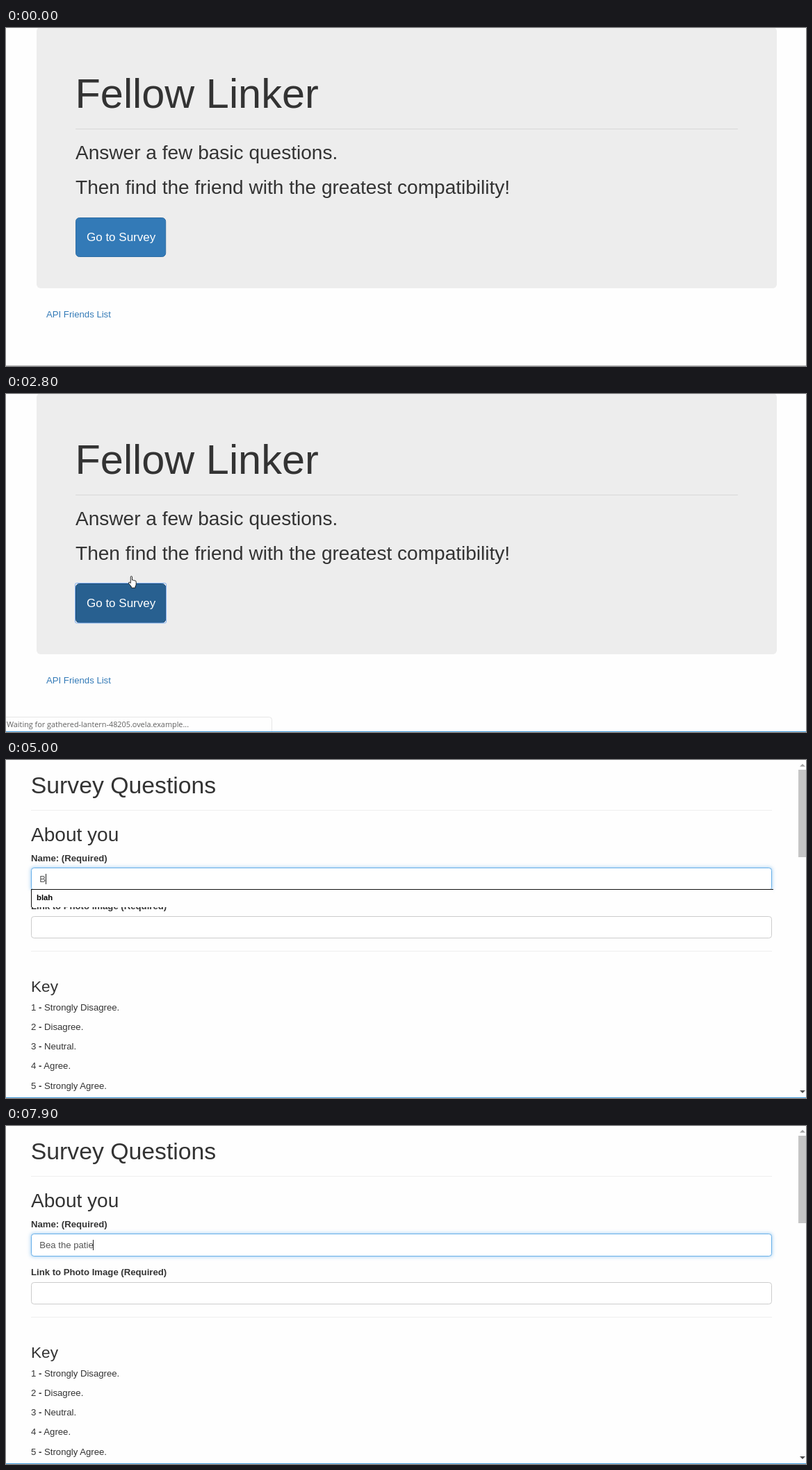
An HTML page for the animation above (8000 ms loop, 1151 by 487 pixels).

```html
<!DOCTYPE html>
<html lang="en">
<head>
<meta charset="utf-8">
<title>Survey</title>
<style>
  html, body { margin: 0; width: 100%; height: 100%; overflow: hidden; background: #fefefe; }
  svg { display: block; width: 1151px; height: 487px; }
  text { font-family: "Liberation Sans", Arial, sans-serif; font-size: 13.17px; fill: #333; white-space: pre; }
  .h1 { font-size: 33.75px; }
  .h2 { font-size: 28.06px; }
  .h3 { font-size: 22.65px; }
  .b { font-weight: bold; }
  .box { fill: #fff; stroke: #ccc; }
  .cursor { fill: #fff; stroke: #111; stroke-width: .9; stroke-linejoin: round; }
  .status { font-family: "Open Sans", "Noto Sans", sans-serif; font-size: 10.85px; fill: #606060; }
</style>
</head>
<body>
<svg viewBox="0 0 1151 487" xmlns="http://www.w3.org/2000/svg">
  <defs>
    <filter id="blur" x="-5%" y="-60%" width="110%" height="220%"><feGaussianBlur stdDeviation="2.6"/></filter>
  </defs>
  <rect width="1151" height="487" fill="#fefefe"/>

  <g id="home">
    <rect x="44" y="-1" width="1065" height="376" rx="5.7" fill="#ededed"/>
    <text x="99.5" y="115" style="font-size:59.46px">Fellow Linker</text>
    <rect x="100" y="145" width="953" height="1" fill="#d8d8d8"/>
    <text class="h2" x="100" y="189">Answer a few basic questions.</text>
    <text class="h2" x="100" y="238.5">Then find the friend with the greatest compatibility!</text>
    <rect id="button" x="100.5" y="273.5" width="129.2" height="56" rx="5.2"/>
    <rect id="ring" x="99.5" y="272.5" width="131" height="57.5" rx="2" fill="none" stroke="#7fb0f2"/>
    <text x="116" y="307" style="font-size:17px;fill:#fff">Go to Survey</text>
    <text x="58" y="416.5" style="fill:#337ab7">API Friends List</text>
  </g>

  <g id="survey">
    <text class="h1" x="35.8" y="47.5">Survey Questions</text>
    <rect x="36" y="72" width="1066" height="1" fill="#eee"/>
    <text class="h2" x="36" y="117">About you</text>
    <text class="b" x="36" y="146">Name: (Required)</text>
    <rect id="glow" x="35" y="154" width="1068" height="35" rx="5" fill="#66afe9" filter="url(#blur)"/>
    <rect id="field" class="box" x="36.5" y="155.5" width="1065" height="32" rx="3.8"/>
    <text id="name" x="48.2" y="176" style="fill:#555"></text>
    <rect id="caret" y="164" width="1" height="15" fill="#222"/>
    <text class="b" x="36" y="215">Link to Photo Image (Required)</text>
    <rect class="box" x="36.5" y="225.5" width="1065" height="31" rx="3.8"/>
    <g id="popup">
      <rect id="sheet" x="36" y="186" width="1068" fill="#fefefe"/>
      <rect x="36" y="186" width="1068" height="1" fill="#111"/>
      <rect id="edge" x="36" y="186" width="1" fill="#111"/>
      <text id="hint" class="b" x="44" y="202" style="font-size:11.33px;fill:#000">blah</text>
    </g>
    <rect x="36" y="275" width="1066" height="1" fill="#eee"/>
    <text class="h3" x="36" y="334">Key</text>
    <g id="key"></g>
    <rect x="1140" y="14" width="11" height="126" fill="#c5c5c5"/>
    <path d="M1142 9.5h8l-4-4z" fill="#a3a3a3"/>
    <path d="M1142 476h8l-4 4z" fill="#505050"/>
  </g>

  <g id="status">
    <path d="M-1 465.5H378.5a4 4 0 0 1 4 4V487H-1z" fill="#fefefe" stroke="#e6e6e6"/>
    <text id="statusText" class="status" x="1" y="480"></text>
  </g>
  <rect id="base" y="486" width="1151" height="1"/>

  <path id="arrow" class="cursor" d="M.5 .5V12.2L3.2 9.7 5 13.9 6.9 13.1 5.1 9.1H8.6z"/>
  <path id="hand" class="cursor" d="M3.3 10.6V1.8Q3.3 .5 4.4 .5T5.5 1.8V6.2Q6.5 5.6 7.3 6.5 8.3 6 9 7 11.2 6.6 11.2 8.6V12Q11.2 14 10 15V17.3H4.3V15.5L.8 11.2Q0 9.8 1 9.2 2 8.9 3.3 10.6z"/>
  <path id="beam" d="M-3 -7.5H-1L0 -6.8 1 -7.5H3M0 -7V7M-3 7.5H-1L0 6.8 1 7.5H3" fill="none" stroke="#222"/>
</svg>
<script>
const LOOP = 8000, STEP = 100;
const $ = id => document.getElementById(id);
const show = (id, on) => $(id).setAttribute("visibility", on ? "inherit" : "hidden");
const set = (id, attrs) => { for (const k in attrs) $(id).setAttribute(k, attrs[k]); };

const HOST = "gathered-lantern-48205.ovela.example";
const TYPED = "Bea the patie";
const KEYS = [4700, 5200, 5400, 5900, 6200, 6300, 6400, 6500, 6600, 7400, 7600, 7800, 7900];

// pointer path: time, x, y
const PATH = [
  [0, 262, -40], [300, 232, 208], [400, 232, 208], [1300, 190, 273],
  [1800, 182, 294], [2400, 182, 294], [2800, 176, 262], [3000, 176, 262],
  [3100, 180, 262], [3700, 196, 171]
];

["Strongly Disagree.", "Disagree.", "Neutral.", "Agree.", "Strongly Agree."].forEach((label, i) => {
  $("key").innerHTML += `<text x="36" y="${361.3 + i * 28.05}">${i + 1} <tspan class="b">-</tspan> ${label}</text>`;
});

function pointer(t) {
  const i = PATH.findIndex(p => p[0] > t);
  if (i < 0) return PATH[PATH.length - 1].slice(1);
  const [t0, x0, y0] = PATH[i - 1], [t1, x1, y1] = PATH[i];
  const k = (t - t0) / (t1 - t0);
  return [x0 + (x1 - x0) * k, y0 + (y1 - y0) * k];
}

function drawHome(t) {
  const hover = t >= 1400;
  set("button", { fill: hover ? "#286090" : "#337ab7", stroke: hover ? "#204d74" : "#2e6da4" });
  show("ring", t >= 2200);
}

function drawForm(t) {
  const focus = t < 4500 ? 0 : t < 4700 ? 0.5 : 1;
  set("glow", { opacity: focus * 0.5 });
  $("field").style.stroke = ["#ccc", "#99bedb", "#66afe9"][focus * 2];

  $("name").textContent = TYPED.slice(0, KEYS.filter(k => k <= t).length);
  const last = KEYS.filter(k => k <= t).pop() || 4500;
  set("caret", { x: Math.floor(48.3 + $("name").getComputedTextLength()) });
  show("caret", focus > 0 && (t - last) % 1000 < 500);

  const open = t >= 4900;
  show("popup", t >= 4700 && t < 5200);
  show("hint", open && t < 5200);
  set("sheet", { height: open ? 26 : 1 });
  set("edge", { height: open ? 26 : 1 });
}

function drawPointer(t, home) {
  const [x, y] = pointer(t);
  const overField = y > 155 && y < 188 || y > 225 && y < 257;
  const kind = t >= 4700 || t < 100 ? "" : home ? (t >= 1400 ? "hand" : "arrow") : overField ? "beam" : "arrow";
  for (const id of ["arrow", "hand", "beam"]) {
    show(id, id === kind);
    set(id, { transform: `translate(${Math.round(x)} ${Math.round(y)})` });
  }
}

function draw(time) {
  const t = Math.floor(time % LOOP / STEP) * STEP;
  const home = t < 3100;
  show("home", home);
  show("survey", !home);
  show("ring", false);
  show("popup", false);
  show("hint", false);
  show("caret", false);
  if (home) drawHome(t);
  else drawForm(t);
  show("status", t >= 1400 && t < 3400);
  $("statusText").textContent = t < 2700 ? `https://${HOST}/survey` : `Waiting for ${HOST}...`;
  set("base", { fill: t < 2200 ? "#b8b8b8" : "#3f9bdc" });
  drawPointer(t, home);
}

function frame() {
  draw(performance.now());
  requestAnimationFrame(frame);
}
frame();
</script>
</body>
</html>
```
